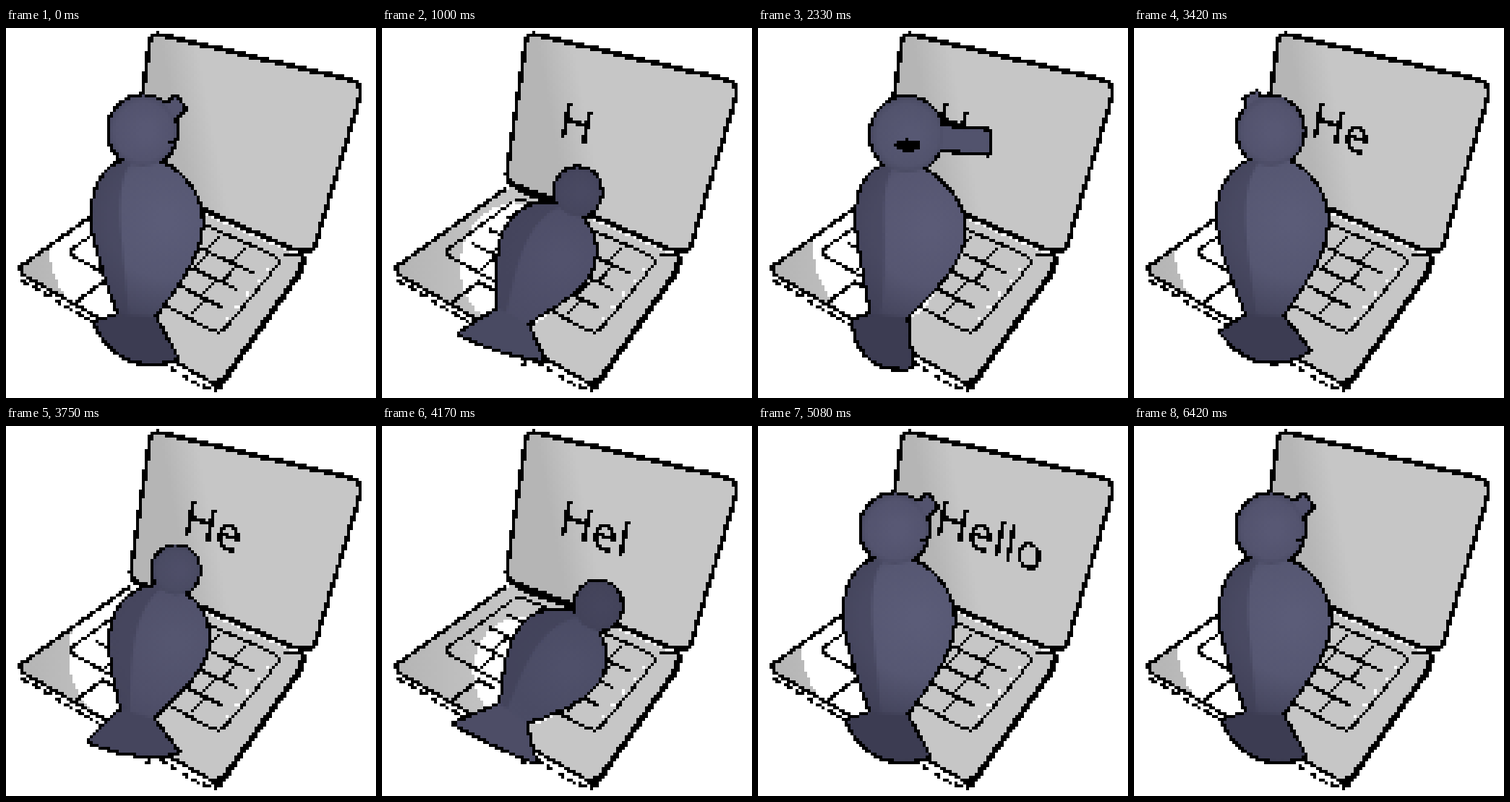
These frames come from a looping animation (512 by 512 pixels, 6660 ms). An HTML page with a canvas:

```html
<!DOCTYPE html>
<html lang="en">
<head>
<meta charset="utf-8">
<title>Bird typing</title>
<style>
  html, body { margin: 0; width: 100%; height: 100%; overflow: hidden; background: #fff; }
  canvas { display: block; width: 100vw; height: 100vh; image-rendering: pixelated; }
</style>
</head>
<body>
<canvas id="stage" width="128" height="128"></canvas>
<script>
const LOOP = 6660, TICKS = 80, SIZE = 128;
const out = document.getElementById('stage').getContext('2d');
const pen = Object.assign(document.createElement('canvas'), { width: SIZE, height: SIZE })
  .getContext('2d', { willReadFrequently: true });

// head: x, y, radius; tail: its two tips; beak: tip; eye: x, radius
const poses = {
  rest: { head: [189, 143, 46], bend: [11], tail: [124, 408, 236, 457], beak: [241, 104], eye: [231, 6] },
  back: { head: [189, 143, 45], bend: [7], tail: [121, 421, 242, 446], beak: [162, 94], eye: [226, 0] },
  side: { head: [206, 148, 49], bend: [19], tail: [132, 405, 213, 469], beak: [319, 158], eye: [207, 17] },
  lean: { head: [235, 200, 32], bend: [3], tail: [115, 436, 238, 452], beak: [260, 181], eye: [235, 0] },
  peck: { head: [299, 249, 32], bend: [0], tail: [101, 412, 212, 465], beak: [322, 249], eye: [299, 0] }
};
const typing = [12, 17, 50, 54, 57], erasing = [69, 71, 73, 75, 77];
const WAIST = [181, 398];

const clamp = v => Math.min(1, Math.max(0, v));
const trapezoid = (t, a, b, c, d) => clamp(Math.min((t - a) / (b - a), (d - t) / (d - c)));
const passed = (list, t) => list.filter(v => v <= t).length;

// How far the bird bows: 1 is leaning, 2 is beak on the keys.
function bow(t) {
  const reach = t < 30 ? .7 : 1.25;
  const dip = Math.max(0, ...typing.map(key => 1 - (t - key + 1) ** 2 / 5));
  return Math.max(trapezoid(t, 8, 10, 20, 22), trapezoid(t, 43, 45, 58, 61)) * (1 + reach * dip);
}

function poseAt(t) {
  const h = bow(t);
  const weights = {
    lean: h < 1 ? h : 2 - h,
    peck: Math.max(0, h - 1),
    side: trapezoid(t, 25, 28, 30, 34),
    back: 1.5 * trapezoid(t, 31, 34, 40, 43)
  };
  const pose = {};
  for (const part in poses.rest) {
    pose[part] = poses.rest[part].map((v, i) =>
      Object.keys(weights).reduce((sum, k) => sum + weights[k] * (poses[k][part][i] - v), v));
  }
  return pose;
}

// Paints a layer in stage units, then snaps its edges to whole pixels.
function layer(paint) {
  pen.setTransform(1, 0, 0, 1, 0, 0);
  pen.clearRect(0, 0, SIZE, SIZE);
  pen.setTransform(.25, 0, 0, .25, 0, 0);
  pen.lineJoin = pen.lineCap = 'round';
  pen.fillStyle = pen.strokeStyle = '#000';
  paint(pen);
  const img = pen.getImageData(0, 0, SIZE, SIZE), d = img.data;
  for (let i = 3; i < d.length; i += 4) d[i] = d[i] > 112 ? 255 : 0;
  pen.putImageData(img, 0, 0);
  out.drawImage(pen.canvas, 0, 0);
}

function path(points, closed) {
  const shape = new Path2D();
  points.forEach(p => shape.lineTo(...p));
  if (closed) shape.closePath();
  return shape;
}

function oval(x, y, rx, ry) {
  const shape = new Path2D();
  shape.ellipse(x, y, Math.max(rx, 0), Math.max(ry, 0), 0, 0, 7);
  return shape;
}

function ramp(gradient, ...stops) {
  stops.forEach(([at, color]) => gradient.addColorStop(at, color));
  return gradient;
}

const lid = new Path2D('M212 9 L478 72 Q491 75 490 90 L489 98 L428 300 Q425 309 413 309 L392 304 ' +
  'L270 250 L182 217 Q171 212 173 198 L199 20 Q201 8 212 9Z');
const base = new Path2D('M174 222 L20 330 L22 340 L285 491 L300 488 L410 332 L411 318 L190 222Z');
const keyboard = new Path2D('M92 306 L182 240 Q190 235 198 239 L372 315 Q382 320 376 328 L304 415 ' +
  'Q296 425 284 418 L94 317 Q86 312 92 306Z');
const edges = new Path2D('M172 222 L20 330 L21 340 L285 491 L300 490 M190 226 L258 250 ' +
  'M386 312 L410 316 M95 381 L133 352 L156 363 M205 390 L208 412 M199 456 L196 468');
const thickEdge = new Path2D('M411 320 L409 335 L301 488 L286 492');
const underside = new Path2D('M24 350 L268 494 L288 501 L304 494');

// Position on the keyboard: u along the front edge, v towards the hinge.
function spot(u, v) {
  const blend = (a, b, c, d) => (a + (b - a) * u) * (1 - v) + (c + (d - c) * u) * v;
  return [blend(92, 291, 188, 376), blend(312, 418, 238, 320)];
}

function drawKeys(c) {
  for (let row = 0; row < 4; row++) {
    const v = row / 4;
    if (row) c.stroke(path([spot(.04, v), spot(.93, v)]));
    for (let i = 1; i < 5; i++) {
      const u = (i + .1 - (row % 2) * .2) / 5;
      c.stroke(path([spot(u, v + .03), spot(u, v + .22)]));
    }
  }
}

function drawLaptop(halo) {
  layer(c => {
    c.fillStyle = ramp(c.createLinearGradient(20, 0, 190, 0), [0, '#b4b4b4'], [.6, '#c0c0c0'], [1, '#c6c6c6']);
    c.fill(base);
  });
  layer(c => {
    c.fillStyle = ramp(c.createLinearGradient(222, 60, 270, 51), [0, '#b5b5b5'], [1, '#c6c6c6']);
    c.fill(lid);
  });
  layer(c => {
    c.fillStyle = '#fff';
    c.fill(halo);
  });
  layer(c => {
    c.lineWidth = 5.5;
    c.stroke(lid);
    c.lineWidth = 4.5;
    c.stroke(edges);
    c.lineWidth = 4;
    c.stroke(keyboard);
    drawKeys(c);
    c.lineWidth = 8;
    c.stroke(thickEdge);
    c.lineWidth = 4.5;
    c.setLineDash([9, 8]);
    c.stroke(underside);
    c.setLineDash([]);
  });
  layer(c => {
    c.fillStyle = '#fff';
    for (let i = 0; i < 5; i++) c.fillRect(304 + i * 14, 400 - i * 17, 5, 5);
  });
}

function drawText(count) {
  layer(c => {
    c.setTransform(.93 / 4, .36 / 4, -.2 / 4, .25, 242 / 4, 147 / 4);
    c.font = '400 66px "Open Sans", sans-serif';
    c.fillText('Hello'.slice(0, count), 0, 0);
  });
}

// The body is a row of ribs from neck to waist; f runs from -1 (left) to 1 (right).
function ribsOf({ head: [x, y, r], bend: [bend] }) {
  const dx = WAIST[0] - x, dy = WAIST[1] - y, dist = Math.hypot(dx, dy);
  const ux = dx / dist, uy = dy / dist, width = 34 + .16 * dist;
  return (s, f) => {
    const along = r * .9 + (dist - r * .9) * s;
    const half = width * (.32 + .68 * Math.sin(Math.PI * s ** .7));
    const across = f * half + bend * Math.sin(Math.PI * s);
    return [x + ux * along + uy * across, y + uy * along - ux * across];
  };
}

function strip(rib, left, right) {
  const points = [];
  for (let i = 0; i <= 24; i++) {
    points.push(rib(i / 24, right));
    points.unshift(rib(i / 24, left));
  }
  return path(points, true);
}

function tailOf(rib, [lx, ly, rx, ry], sag) {
  const len = Math.hypot(rx - lx, ry - ly) / (2 * sag);
  const shape = path([rib(.85, 0), rib(1, -1), [lx, ly]]);
  shape.quadraticCurveTo((lx + rx - (ry - ly) / len * 2) / 2, (ly + ry + (rx - lx) / len * 2) / 2, rx, ry);
  shape.lineTo(...rib(1, 1));
  shape.closePath();
  return shape;
}

function beakOf([x, y], [tx, ty]) {
  const dx = tx - x, dy = ty - y, len = Math.hypot(dx, dy) || 1;
  const half = len * .1 + 4, nx = -dy / len * half, ny = dx / len * half;
  return path([[x + nx, y + ny], [tx + nx, ty + ny], [tx - nx, ty - ny], [x - nx, y - ny]], true);
}

function tone(k) {
  return `rgb(${[60, 60, 82].map((v, i) => v + k * [33, 34, 40][i] | 0)})`;
}

function drawBird(pose, rib, lit) {
  const [x, y, r] = pose.head;
  const tail = tailOf(rib, pose.tail, 2 + 25 * lit * lit);
  const beak = beakOf(pose.head, pose.beak);
  const head = oval(x, y, r, r * 1.06), body = strip(rib, -1, 1);

  layer(c => {
    c.lineWidth = 9;
    [tail, beak, body, head].forEach(s => { c.stroke(s); c.fill(s); });
  });
  layer(c => {
    const glow = rib(.38, .35), bright = .55 + .4 * lit;
    c.fillStyle = tone(.6 - .6 * lit);
    c.fill(tail);
    c.fillStyle = ramp(c.createRadialGradient(...glow, 10, ...glow, 165),
      [0, tone(bright)], [.45, tone(bright - .15)], [1, tone(.6 - .6 * lit)]);
    c.fill(body);
    // Folded wing along the left flank.
    c.globalAlpha = .5;
    c.fillStyle = tone(0);
    c.fill(strip(rib, -1, -.5));
    c.globalAlpha = 1;
    c.fillStyle = tone(.15 + .55 * lit);
    c.fill(beak);
    c.fillStyle = ramp(c.createRadialGradient(x + 6, y, r * .2, x, y, r * 1.15),
      [0, tone(.2 + .65 * lit)], [.7, tone(.15 + .55 * lit)], [1, tone(.1 + .2 * lit)]);
    c.fill(head);
  });
  layer(c => c.fill(oval(pose.eye[0], y + 14, pose.eye[1], pose.eye[1] * .5)));
}

function draw(tick) {
  const pose = poseAt(tick), rib = ribsOf(pose), top = pose.head[1] + 15;
  const tall = (415 - top) / 2;
  out.fillStyle = '#fff';
  out.fillRect(0, 0, SIZE, SIZE);
  drawLaptop(oval(rib(.45, 0)[0] - 41, top + tall, 30 + tall * .52, tall));
  drawText(passed(typing, tick) - passed(erasing, tick));
  drawBird(pose, rib, clamp((265 - pose.head[1]) / 120));
}

const start = performance.now();
let shown = -1;
function run() {
  const tick = Math.floor((performance.now() - start) % LOOP / LOOP * TICKS);
  if (tick !== shown) draw(shown = tick);
  requestAnimationFrame(run);
}
run();
</script>
</body>
</html>
```
